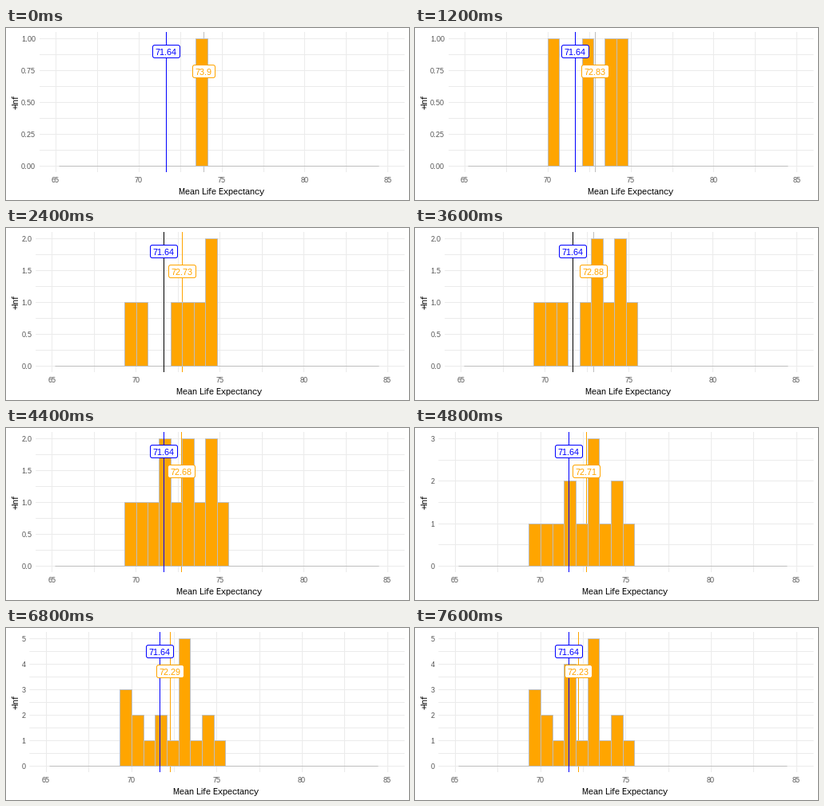
A matplotlib script for the animation above (8 s loop, 504x216 px).

```python
import math

import matplotlib.pyplot as plt
from matplotlib.animation import FuncAnimation
from matplotlib.patches import FancyBboxPatch, Rectangle

WIDTH, HEIGHT, DPI = 504, 216, 72
TOP, BOTTOM, RIGHT = 5, 181, 498.5
BASE, FULL = 173.5, 160            # y of zero, height of the tallest bar
X_MIN, X_MAX = 64.04, 86.02
BIN_START, BIN_WIDTH, BINS = 65.22, 0.688, 28
TRUE_MEAN = 71.64
GRID, EDGE, ORANGE, BLUE = "#EBEBEB", "#BEBEBE", "#FFA500", "#0000FF"

SAMPLES = [73.9, 70.58, 72.16, 74.68, 74.3, 70.02, 73.47, 73.2, 71.2, 75.29,
           71.7, 71.7, 73.03, 73.2, 70.5, 69.79, 69.6, 72.85, 71.75, 71.68]

# tallest bar -> (panel left, tick step, tick format)
LAYOUTS = {1: (42, 0.25, "{:.2f}"), 2: (37.2, 0.5, "{:.1f}")}
WHOLE = (29.4, 1, "{:.0f}")

# strokes are placed on pixel centres by hand, so no further snapping
plt.rcParams.update({"font.family": "Liberation Sans", "path.snap": False,
                     "text.hinting": "native", "text.hinting_factor": 1})
fig = plt.figure(figsize=(WIDTH / DPI, HEIGHT / DPI), dpi=DPI, facecolor="white")
ax = fig.add_axes([0, 0, 1, 1])


def line(x0, y0, x1, y1, color, z):
    ax.plot([x0, x1], [y0, y1], color=color, lw=1, zorder=z,
            solid_capstyle="butt")


def text(x, y, label, size, color, align="center", **kw):
    ax.text(x, y, label, fontsize=size, color=color, ha=align,
            va="baseline", **kw)


def tag(x, y, value, color):
    label = f"{round(value, 2):g}"
    width = 6 * len(label) + 4
    ax.add_patch(FancyBboxPatch((x - width / 2, y - 8), width, 16,
                                boxstyle="round,pad=0,rounding_size=2.5",
                                fc="white", ec=color, lw=1, zorder=6))
    text(x - 1, y + 4.5, label, 11, color, zorder=7)


def count_bins(values):
    counts = [0] * BINS
    for v in values:
        counts[int((v - BIN_START) / BIN_WIDTH)] += 1
    return counts


def draw(frame):
    ax.clear()
    ax.set(xlim=(0, WIDTH), ylim=(HEIGHT, 0))
    ax.axis("off")

    seen = SAMPLES[:frame + 1]
    n = len(seen)
    mean = sum(seen) / n
    counts = count_bins(seen)
    peak = max(counts)
    left, step, fmt = LAYOUTS.get(peak, WHOLE)
    scale = (RIGHT - left) / (X_MAX - X_MIN)

    def px(v):
        return left + (v - X_MIN) * scale

    def column(v):
        return math.floor(px(v) + 0.5) + 0.5

    def row(v):
        return math.floor(BASE - FULL * v / peak) + 0.5

    # grid with minor lines halfway between the ticks
    for i in range(9):
        x = column(65 + 2.5 * i)
        line(x, TOP, x, BOTTOM, GRID, 1)
        if i % 2 == 0:
            text(px(65 + 2.5 * i), 194, str(65 + 5 * i // 2), 9, "#4D4D4D")
    for i in range(round(2 * peak / step) + 1):
        value = i * step / 2
        line(left, row(value), RIGHT, row(value), GRID, 1)
        if i % 2 == 0:
            text(left - 5, row(value) + 3.5, fmt.format(value), 9,
                 "#4D4D4D", "right")

    # the lines take neutral tones in the early part
    mean_color = EDGE if n <= 4 or n == 10 else ORANGE
    true_color = "black" if 5 <= n <= 10 else BLUE
    line(column(mean), TOP, column(mean), BOTTOM, mean_color, 2)

    edges = [math.floor(px(BIN_START + k * BIN_WIDTH)) + 0.5
             for k in range(BINS + 1)]
    line(edges[0], BASE, edges[-1], BASE, EDGE, 3)
    for k, c in enumerate(counts):
        if c:
            ax.add_patch(Rectangle((edges[k], row(c)), edges[k + 1] - edges[k],
                                   BASE - row(c), fc=ORANGE, ec=EDGE, lw=1,
                                   zorder=4))

    line(column(TRUE_MEAN), TOP, column(TRUE_MEAN), BOTTOM, true_color, 5)
    tag(column(TRUE_MEAN), BASE - 0.9 * FULL, TRUE_MEAN, BLUE)
    tag(column(mean), BASE - 0.75 * FULL + 1, mean, ORANGE)

    text((left + RIGHT) / 2 - 1, 209, "Mean Life Expectancy", 11, "black")
    text(15.5, 92.5, "+Inf", 11, "black", rotation=90, rotation_mode="anchor")
    return []


anim = FuncAnimation(fig, draw, frames=len(SAMPLES), interval=400,
                     init_func=lambda: [], repeat=True, repeat_delay=0)
plt.show()
```
